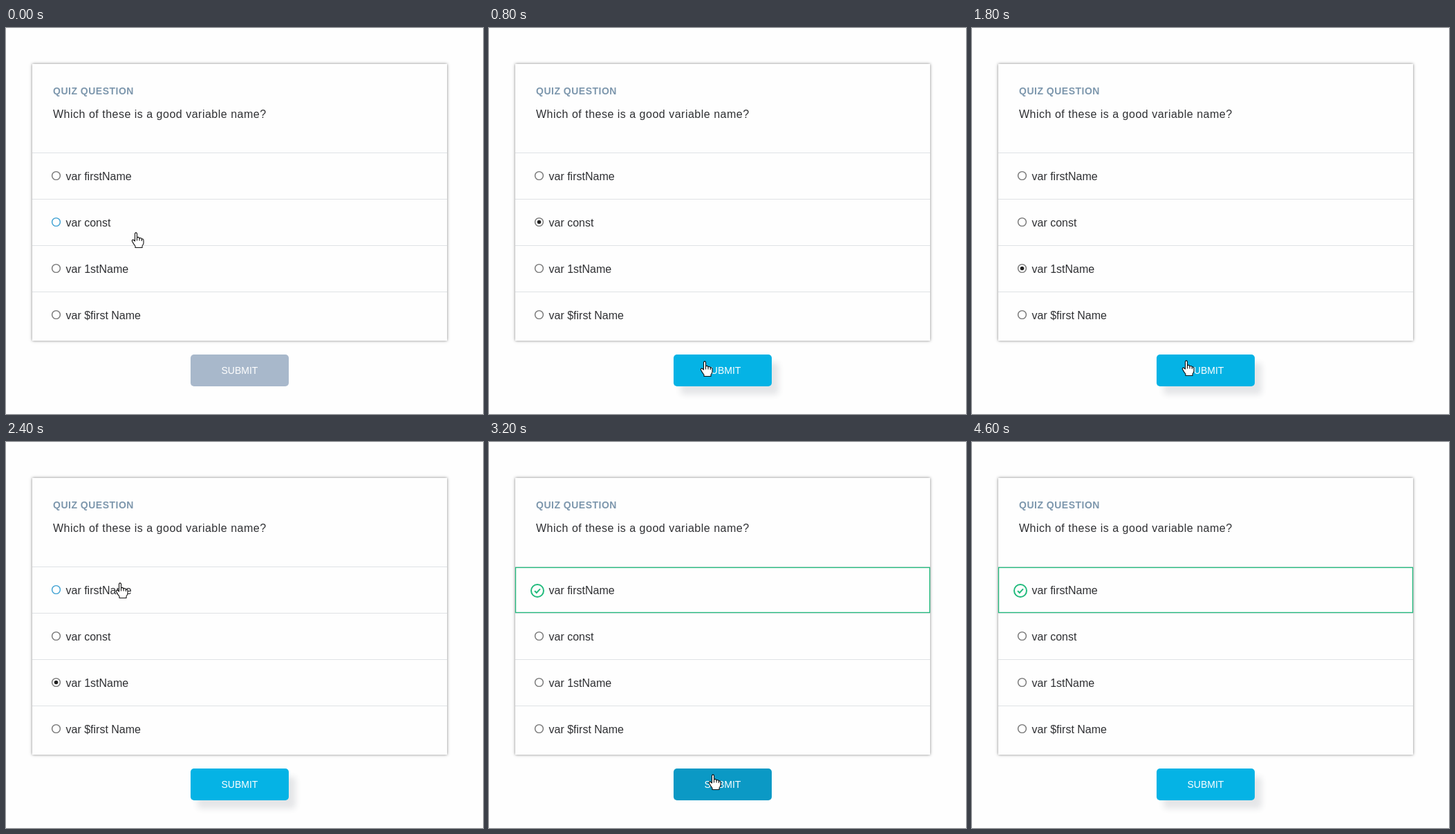
An HTML page with a canvas for the animation above (4800 ms loop, 690 by 558 pixels).

```html
<!DOCTYPE html>
<html lang="en">
<head>
<meta charset="utf-8">
<title>Quiz question</title>
<style>
  html, body { margin: 0; width: 100%; height: 100%; overflow: hidden; background: #fefefe; }
  canvas { display: block; }
</style>
</head>
<body>
<canvas id="stage" width="690" height="558"></canvas>
<script>
const ctx = document.getElementById('stage').getContext('2d');
const LOOP = 4800, STEP = 200, HOVER_LAG = 100, FADE = 400;
const FONT = '"Liberation Sans", Arial, sans-serif';
const GREEN = '#22bb7d', BLUE = '#3a9fd2', GREY = '#747474', INK = '#2f3033';
const DISABLED = [168, 184, 203], ACTIVE = [5, 179, 229], PRESSED = [11, 153, 197];
const options = ['var firstName', 'var const', 'var 1stName', 'var $first Name'];

// Each try picks a row, then holds the button down
const tries = [
  { row: 1, pick: 200, press: 1000, release: 1400 },
  { row: 2, pick: 1400, press: 2000, release: 2400 },
  { row: 0, pick: 2600, press: 3200, release: 4600 }
];

// Stops of the pointer tip: time, x, y
const stops = [
  [0, 188, 295], [200, 190, 298], [400, 213, 331], [800, 312, 481],
  [1000, 314, 482], [1200, 246, 392], [1400, 217, 345], [1800, 310, 480],
  [2000, 310, 481], [2400, 165, 203], [2600, 167, 206], [3000, 324, 480],
  [4000, 327, 481], [4400, 378, 590], [LOOP, 378, 590]
];

const clamp = v => Math.min(1, Math.max(0, v));
const mix = (a, b, k) => a + (b - a) * k;
const smooth = k => k * k * (3 - 2 * k);
const rowTop = i => 181 + 67 * i;

function pointerAt(t) {
  const i = stops.findIndex(s => s[0] > t);
  const [t0, x0, y0] = stops[i - 1], [t1, x1, y1] = stops[i];
  const k = smooth((t - t0) / (t1 - t0));
  return [mix(x0, x1, k), mix(y0, y1, k)];
}

function hoveredRow(t) {
  const y = pointerAt(Math.max(0, t - HOVER_LAG))[1];
  return y < 452 ? Math.min(3, Math.floor((y - rowTop(0)) / 67)) : -1;
}

function buttonAt(t) {
  if (tries.some(a => t >= a.press && t < a.release)) return { color: PRESSED, lift: 0 };
  const lift = clamp((t - tries[0].pick) / FADE);
  return { color: DISABLED.map((c, i) => mix(c, ACTIVE[i], lift)), lift };
}

function text(str, x, y, font, color, spacing = 0) {
  ctx.font = font + ' ' + FONT;
  ctx.letterSpacing = spacing + 'px';
  ctx.fillStyle = color;
  ctx.fillText(str, x, y);
}

function disc(x, y, r) {
  ctx.beginPath();
  ctx.arc(x, y, r, 0, Math.PI * 2);
}

function setShadow(color, blur = 0, x = 0, y = 0) {
  ctx.shadowColor = color;
  ctx.shadowBlur = blur;
  ctx.shadowOffsetX = x;
  ctx.shadowOffsetY = y;
}

function drawCard() {
  setShadow('rgba(0,0,0,.5)', 4);
  ctx.fillStyle = '#fefefe';
  ctx.fillRect(38, 52, 600, 400);
  setShadow('transparent');
  text('QUIZ QUESTION', 68, 96, 'bold 14px', '#7d97ad', 0.5);
  text('Which of these is a good variable name?', 68, 130, '16px', INK, 0.5);
  options.forEach((label, i) => {
    ctx.fillStyle = '#dfe2e5';
    ctx.fillRect(38, rowTop(i) - 1, 600, 1);
    text(label, 86.5, rowTop(i) + 39, '16px', INK);
  });
}

function drawRadio(i, selected, hovered) {
  const y = rowTop(i) + 32.5;
  ctx.strokeStyle = hovered ? BLUE : GREY;
  ctx.lineWidth = 1.4;
  disc(72.5, y, 5.9);
  ctx.stroke();
  if (selected) {
    ctx.fillStyle = hovered ? BLUE : '#202020';
    disc(72.5, y, 2.8);
    ctx.fill();
  }
}

function drawCorrect() {
  ctx.strokeStyle = GREEN;
  ctx.lineWidth = 1.3;
  ctx.strokeRect(38.5, 181.5, 599, 65);
  ctx.lineWidth = 2;
  disc(70, 215, 9);
  ctx.stroke();
  ctx.beginPath();
  ctx.moveTo(66, 215.3);
  ctx.lineTo(68.8, 218);
  ctx.lineTo(74, 212.4);
  ctx.stroke();
}

function drawButton({ color, lift }) {
  setShadow(`rgba(46,61,73,${0.12 * lift})`, 8, 10 * lift, 12 * lift);
  ctx.fillStyle = `rgb(${color.map(Math.round)})`;
  ctx.beginPath();
  ctx.roundRect(267, 472, 142, 46, 5);
  ctx.fill();
  setShadow('transparent');
  text('SUBMIT', 311.5, 500, '14px', '#fff');
}

const hand = new Path2D(
  'M-1.5 1.5 Q0 -.7 1.5 1.5 V7.5 Q3.8 5.8 5 8.5 Q7.4 7 8.3 9.6 Q10.6 8.8 11 11.5 ' +
  'V15.5 Q10.8 17.5 9 19.5 V22 H-1 V19.8 L-3.3 16.6 L-5.8 12.3 Q-5 8.8 -1.5 12.5 Z');
const knuckles = new Path2D('M1.5 7.5 V12 M5 8.5 V12 M8.3 9.6 V12.5');

function drawPointer([x, y]) {
  ctx.save();
  ctx.translate(Math.round(x), Math.round(y) + 0.5);
  ctx.fillStyle = '#fff';
  ctx.strokeStyle = '#111';
  ctx.lineWidth = 1.1;
  ctx.lineJoin = 'round';
  ctx.fill(hand);
  ctx.stroke(hand);
  ctx.stroke(knuckles);
  ctx.restore();
}

function draw(t) {
  const solved = t >= tries[2].press;
  const picked = tries.filter(a => t >= a.pick).pop();
  const hovered = solved ? -1 : hoveredRow(t);
  ctx.fillStyle = '#fefefe';
  ctx.fillRect(0, 0, 690, 558);
  drawCard();
  for (let i = solved ? 1 : 0; i < 4; i++) drawRadio(i, picked?.row === i, i === hovered);
  if (solved) drawCorrect();
  drawButton(buttonAt(t));
  drawPointer(pointerAt(t));
}

const start = performance.now();
function tick() {
  const t = (performance.now() - start) % LOOP;
  draw(Math.floor(t / STEP) * STEP);
  requestAnimationFrame(tick);
}
tick();
</script>
</body>
</html>
```
